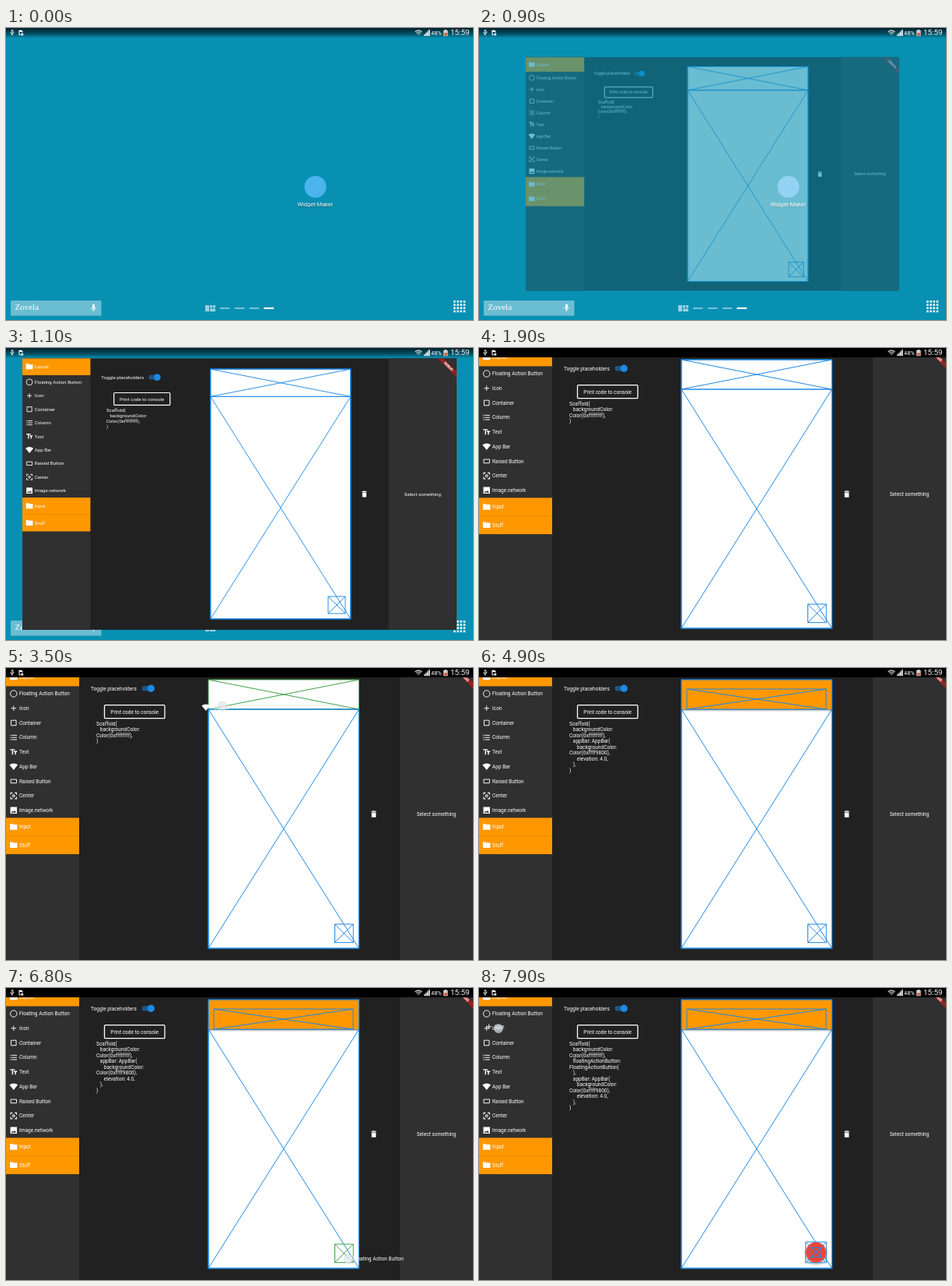
These frames come from a looping animation (600x375 px, 8 s). An HTML page with a canvas:

```html
<!DOCTYPE html>
<html lang="en">
<head>
<meta charset="utf-8">
<title>Widget-Maker</title>
<style>
  html, body { margin: 0; width: 100%; height: 100%; overflow: hidden; background: #0890b3; }
  canvas { display: block; width: 600px; height: 375px; }
</style>
</head>
<body>
<canvas id="stage"></canvas>
<script>
const W = 600, H = 375, LOOP = 8000, STEP = 100;
const BLUE = '#1e88e5', GREEN = '#43a047', ORANGE = '#ff9800';
const SANS = 'Roboto, sans-serif';
const canvas = document.getElementById('stage');
const ctx = canvas.getContext('2d');
const dpr = window.devicePixelRatio || 1;
canvas.width = W * dpr;
canvas.height = H * dpr;

// Icons on a 24 unit grid: path and stroke width (0 means filled)
const ICONS = {
  ring: ['M21 12a9 9 0 1 1-18 0a9 9 0 1 1 18 0z', 2],
  plus: ['M5 12h14M12 5v14', 2],
  square: ['M5 5h14v14h-14z', 2],
  list: ['M2.5 6h3M2.5 12h3M2.5 18h3M7 6h14M7 12h14M7 18h14', 2],
  text: ['M2.5 5.5h13M9 5v14M12.5 10.5h9M17 10v9', 3],
  wedge: ['M12 21.5L23.6 7Q18 3 12 3T.4 7z', 0],
  bar: ['M4 7h16v10h-16z', 2],
  focus: ['M4 9v-5h5M15 4h5v5M20 15v5h-5M9 20h-5v-5M15 12a3 3 0 1 1-6 0a3 3 0 1 1 6 0z', 2.2],
  image: ['M3 3h18v18h-18zM5 18h14l-4.5-6l-3.5 4.5l-2.5-3z', 0],
  folder: ['M2 4h8l2 2h10v14h-20z', 0],
  trash: ['M6 7.5h12v13.5h-12zM5 4h3.5l1-1h5l1 1h3.5v2h-14z', 0],
  mic: ['M9 5a3 3 0 0 1 6 0v6a3 3 0 0 1-6 0zM5.5 11h1.8a4.7 4.7 0 0 0 9.4 0h1.8q-.3 5-5.5 6v4h-2v-4q-5.2-1-5.5-6z', 0],
  usb: ['M12 22v-19M9 6l3-4l3 4M12 18l-5-4v-4M12 15l5-3v-4', 2.4],
  card: ['M5 3h10l4 4v6h-3v-4h-8v9h3v3h-6zM13 15h8v7h-8z', 0]
};
for (const icon of Object.values(ICONS)) icon[0] = new Path2D(icon[0]);

const ITEMS = [
  ['ring', 'Floating Action Button'], ['plus', 'Icon'], ['square', 'Container'],
  ['list', 'Column'], ['text', 'Text'], ['wedge', 'App Bar'],
  ['bar', 'Raised Button'], ['focus', 'Center'], ['image', 'Image.network']
];
const itemY = i => 33 + i * 18.73;

const SLOTS = { appBar: [260, 15, 193.5, 38], fab: [422.5, 329, 23.7, 23.6] };
const BAR_DROP = 3800, FAB_DROP = 6900;

// Finger paths: [time, x, y]
const DRAGS = [
  { item: 5, end: BAR_DROP, path: [[2600, 13, 127], [2800, 30, 126], [3100, 150, 95],
    [3400, 260, 51], [3500, 278, 49], [3700, 300, 36]] },
  { item: 0, end: FAB_DROP, path: [[5100, 13, 34], [5300, 70, 50], [5600, 235, 110], [5700, 263, 130],
    [5900, 318, 180], [6200, 365, 255], [6500, 420, 325], [6700, 442, 349], [6800, 440, 348]] },
  { item: 1, end: LOOP, path: [[7700, 19, 53], [7800, 22, 51], [7900, 25, 52]] }
];
// Opening window: [time, scale, opacity]
const OPENING = [[900, .8, .4], [1000, .81, .8], [1100, .93, 1], [1200, .985, 1], [1300, 1, 1]];

const clamp = v => Math.max(0, Math.min(1, v));

function sample(keys, t) {
  let k = 0;
  while (k < keys.length - 2 && t >= keys[k + 1][0]) k++;
  const a = keys[k], b = keys[k + 1];
  const p = clamp((t - a[0]) / (b[0] - a[0]));
  return [1, 2].map(i => a[i] + (b[i] - a[i]) * p);
}

function box(x, y, w, h, color) {
  ctx.fillStyle = color;
  ctx.fillRect(x, y, w, h);
}

function disc(x, y, r, color) {
  ctx.fillStyle = color;
  ctx.beginPath();
  ctx.arc(x, y, r, 0, Math.PI * 2);
  ctx.fill();
}

function text(str, x, y, { size = 6.56, align = 'left', color = '#fff', font = SANS, weight = 400 } = {}) {
  ctx.font = `${weight} ${size}px ${font}`;
  ctx.textAlign = align;
  ctx.textBaseline = 'middle';
  ctx.fillStyle = color;
  ctx.fillText(str, x, y);
}

function icon(name, x, y, size = 11.25, color = '#fff') {
  const [path, width] = ICONS[name];
  ctx.save();
  ctx.translate(x - size / 2, y - size / 2);
  ctx.scale(size / 24, size / 24);
  ctx.fillStyle = ctx.strokeStyle = color;
  ctx.lineWidth = width;
  if (width) ctx.stroke(path); else ctx.fill(path, 'evenodd');
  ctx.restore();
}

function placeholder([x, y, w, h], color = BLUE, width = 1) {
  ctx.strokeStyle = color;
  ctx.lineWidth = width;
  ctx.beginPath();
  ctx.rect(x, y, w, h);
  ctx.moveTo(x, y);
  ctx.lineTo(x + w, y + h);
  ctx.moveTo(x + w, y);
  ctx.lineTo(x, y + h);
  ctx.stroke();
}

function withShadow(blur, offset, draw) {
  ctx.save();
  ctx.shadowColor = 'rgba(0,0,0,.45)';
  ctx.shadowBlur = blur * dpr;
  ctx.shadowOffsetY = offset * dpr;
  draw();
  ctx.restore();
}

function touch(x, y) {
  disc(x, y, 5.6, 'rgba(222,232,238,.68)');
  ctx.strokeStyle = 'rgba(185,203,214,.7)';
  ctx.lineWidth = .8;
  ctx.stroke();
}

function drawHome() {
  box(0, 0, W, H, '#0890b3');
  const shade = ctx.createLinearGradient(0, 0, 0, 13);
  shade.addColorStop(0, 'rgba(0,20,28,.9)');
  shade.addColorStop(.6, 'rgba(0,20,28,.5)');
  shade.addColorStop(1, 'rgba(0,20,28,0)');
  box(0, 0, W, 13, shade);

  disc(397.5, 204, 14, '#4bb4ec');
  withShadow(2, .6, () => text('Widget-Maker', 397.3, 227, { size: 7.4, align: 'center' }));

  box(6, 350, 116.5, 19.5, 'rgba(255,255,255,.4)');
  text('Zovela', 11.5, 359.5, { size: 11, font: '"Liberation Serif", serif' });
  icon('mic', 112.5, 359.5, 12);

  const pale = 'rgba(255,255,255,.6)';
  box(256, 356, 5, 8, pale);
  box(262, 356, 3, 3.5, pale);
  box(266, 356, 3, 3.5, pale);
  box(262, 360.5, 7, 3.5, pale);
  for (let i = 0; i < 3; i++) box(275 + i * 18.9, 359.2, 12.5, 1.5, pale);
  box(331.3, 358.8, 12.7, 2.2, '#fff');
  for (let i = 0; i < 16; i++) box(575 + i % 4 * 4.2, 350 + (i >> 2) * 4.2, 2.6, 2.6, '#fff');
}

function drawStatus() {
  icon('usb', 8, 6, 9);
  icon('card', 19, 6, 8.5);
  ctx.strokeStyle = '#ddd';
  ctx.lineWidth = 1.1;
  for (const r of [1.8, 4, 6.2]) {
    ctx.beginPath();
    ctx.arc(530, 9.3, r, -Math.PI * .76, -Math.PI * .24);
    ctx.stroke();
  }
  for (let i = 0; i < 4; i++) box(537 + i * 2, 8.2 - i * 2, 1.5, 2 + i * 2, '#fff');
  text('48%', 546, 6.6, { size: 7.4 });
  box(563.5, 2, 2.6, 1.2, '#ccc');
  box(562, 3, 5.6, 7.3, '#ccc');
  box(562.8, 6.5, 4, 3, '#d8502c');
  text('15:59', 571, 6.6, { size: 9.8 });
}

function drawItem(i, dx = 0, dy = 0) {
  const y = itemY(i) + dy;
  icon(ITEMS[i][0], 9.8 + dx, y);
  text(ITEMS[i][1], 17 + dx, y + .3);
}

function folder(label, y) {
  box(0, y, 94, 23.4, ORANGE);
  icon('folder', 9.8, y + 11.5);
  text(label, 17, y + 11.9);
}

function codeLines(t) {
  const lines = ['Scaffold(', '   backgroundColor:', 'Color(0xffffffff),'];
  if (t >= FAB_DROP) lines.push('   floatingActionButton:', 'FloatingActionButton(', '   ),');
  if (t >= BAR_DROP) lines.push('   appBar: AppBar(', '      backgroundColor:', 'Color(0xffff9800),',
    '      elevation: 4.0,', '   ),');
  return [...lines, ')'];
}

function drawBanner() {
  ctx.save();
  ctx.translate(W, 0);
  ctx.rotate(Math.PI / 4);
  box(-18.8, 13.1, 37.6, 5.6, 'rgba(183,28,28,.75)');
  text('DEBUG', 0, 16.1, { size: 4.8, weight: 900, align: 'center' });
  ctx.restore();
}

function drawCanvasArea(t, hovered) {
  const color = name => hovered === name ? GREEN : BLUE;
  box(260, 15, 193.5, 345, '#fff');
  placeholder([260, 53, 193.5, 307]);
  if (t < BAR_DROP) {
    placeholder(SLOTS.appBar, color('appBar'));
  } else {
    const lift = clamp((t - BAR_DROP + 100) / 300);
    ctx.save();
    ctx.beginPath();
    ctx.rect(259.5, 14, 194.5, 347);
    ctx.clip();
    withShadow(3 * lift, 1 * lift, () => box(260, 15, 193.5, 38, ORANGE));
    ctx.restore();
    placeholder([267, 27, 179, 26]);
  }
  if (t < FAB_DROP) {
    placeholder(SLOTS.fab, color('fab'));
  } else {
    const lift = clamp((t - FAB_DROP + 100) / 300);
    withShadow(4 * lift, 1.5 * lift, () => disc(433, 339.5, 13, '#f44336'));
    placeholder([419.7, 326.2, 26.6, 26.6]);
    placeholder([427, 333.5, 12, 12]);
  }
  ctx.strokeStyle = BLUE;
  ctx.lineWidth = 1.3;
  if (hovered === 'appBar') ctx.strokeRect(260, 53, 193.5, 307);
  else ctx.strokeRect(260, 15, 193.5, 345);
}

function drawApp(t) {
  const drag = DRAGS.find(d => t >= d.path[0][0] && t < d.end);
  const finger = drag && sample(drag.path, t);
  const inside = ([x, y, w, h]) => finger &&
    finger[0] >= x && finger[0] <= x + w && finger[1] >= y && finger[1] <= y + h;
  const target = drag && { 5: 'appBar', 0: 'fab' }[drag.item];
  const hovered = target && inside(SLOTS[target]) ? target : null;

  box(0, 0, W, H, '#212121');
  box(0, 0, 94, H, '#303030');
  box(506, 0, 94, H, '#303030');
  folder('Layout', 0);
  ITEMS.forEach((_, i) => drawItem(i));
  folder('Input', 192.4);
  folder('Stuff', 215.7);

  text('Toggle placeholders', 109, 26.6);
  ctx.fillStyle = '#1f5483';
  ctx.beginPath();
  ctx.roundRect(174.5, 23, 15.5, 6.5, 3.25);
  ctx.fill();
  disc(186.3, 26.3, 4.7, BLUE);

  ctx.strokeStyle = '#fff';
  ctx.lineWidth = 1.3;
  ctx.beginPath();
  ctx.roundRect(126.5, 47.7, 77.5, 17, 1.2);
  ctx.stroke();
  text('Print code to console', 165.2, 56.7, { align: 'center' });
  codeLines(t).forEach((line, i) => text(line, 116, 72 + i * 7.47));

  drawCanvasArea(t, hovered);
  icon('trash', 472.5, 187.5);
  text('Select something', 553, 187.8, { align: 'center' });
  drawBanner();

  if (drag) {
    // The carried item trails the finger by one step
    const [x, y] = sample(drag.path, t - STEP);
    const [, x0, y0] = drag.path[0];
    drawItem(drag.item, x - x0, y - y0);
    touch(...finger);
  }
}

function draw(t) {
  ctx.setTransform(dpr, 0, 0, dpr, 0, 0);
  if (t < 1300) drawHome();
  if (t >= 900) {
    const [scale, opacity] = sample(OPENING, t);
    ctx.save();
    if (opacity < 1) {
      // Compose the window separately so that its opacity applies as a whole
      const home = document.createElement('canvas');
      home.width = canvas.width;
      home.height = canvas.height;
      home.getContext('2d').drawImage(canvas, 0, 0);
      ctx.translate(W / 2 * (1 - scale), H / 2 * (1 - scale));
      ctx.scale(scale, scale);
      ctx.beginPath();
      ctx.rect(0, 0, W, H);
      ctx.clip();
      drawApp(t);
      ctx.setTransform(1, 0, 0, 1, 0, 0);
      ctx.globalAlpha = 1 - opacity;
      ctx.drawImage(home, 0, 0);
    } else {
      ctx.translate(W / 2 * (1 - scale), H / 2 * (1 - scale));
      ctx.scale(scale, scale);
      ctx.beginPath();
      ctx.rect(0, 0, W, H);
      ctx.clip();
      drawApp(t);
    }
    ctx.restore();
  }
  if (t >= 1200) box(0, 0, W, 12, '#000');
  drawStatus();
  if (t >= 500 && t < 800) touch(398, 206);
}

function frame(now) {
  draw(Math.floor(now % LOOP / STEP) * STEP);
  requestAnimationFrame(frame);
}
requestAnimationFrame(frame);
</script>
</body>
</html>
```
